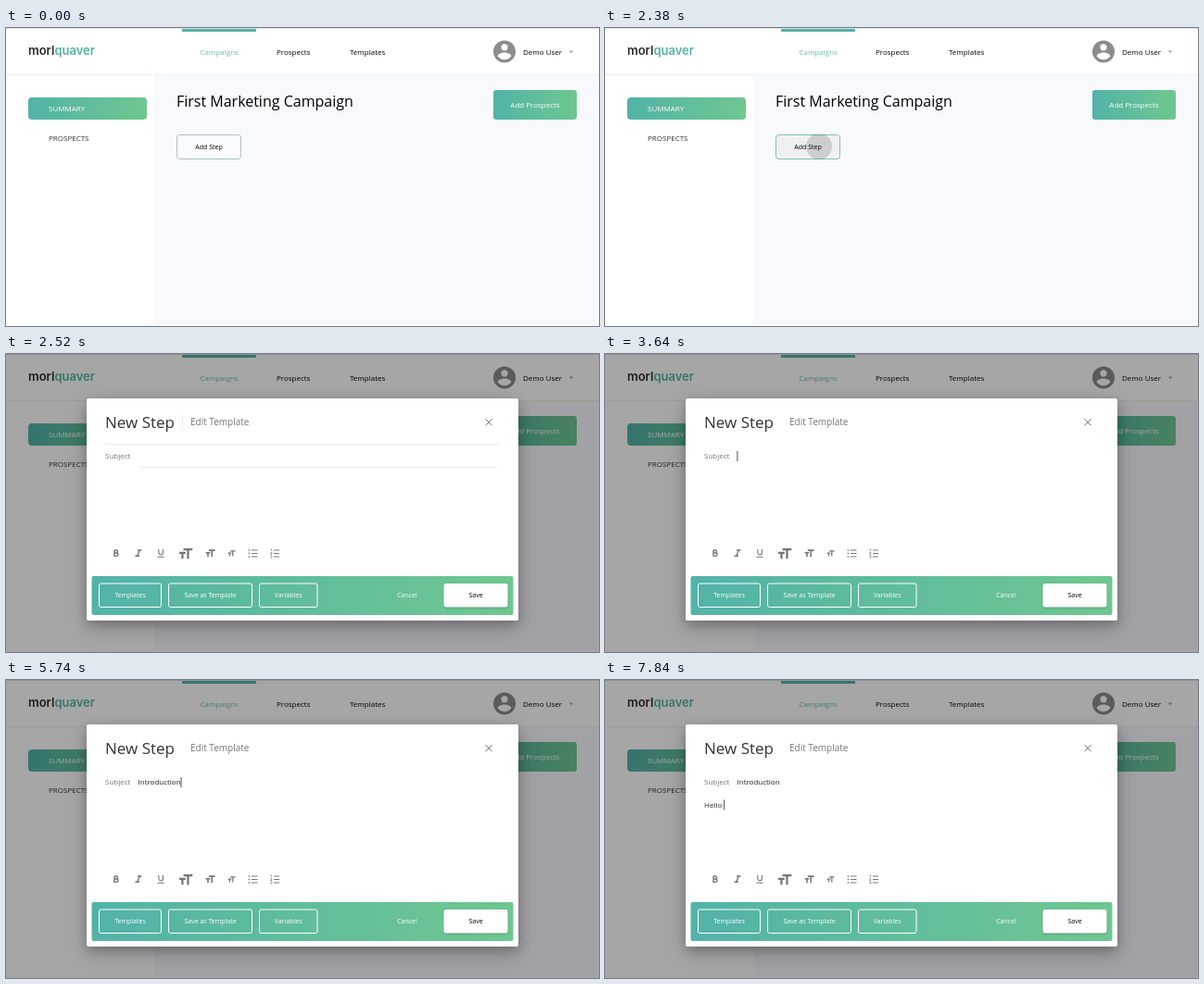
Write an HTML page that moves like this. It is 640 px wide and 322 px high and loops after 8 s.

```html
<!DOCTYPE html>
<html lang="en">
<head>
<meta charset="utf-8">
<style>
  html, body { margin: 0; width: 100%; height: 100%; overflow: hidden; background: #fff; }
  svg { display: block; width: 640px; height: 322px; }
  text { font: 8px "Open Sans", sans-serif; white-space: pre; }
  .small { font-size: 7px; }
  .mid { text-anchor: middle; }
  .logo { font: 600 13px Inter, sans-serif; }
  .light { fill: #fff; }
  .grey { fill: #777; }
  .rule { stroke: #ececec; }
  #panel { filter: drop-shadow(0 4px 6px rgba(0, 0, 0, .2)) drop-shadow(0 7px 11px rgba(0, 0, 0, .2)); }
</style>
</head>
<body>
<svg viewBox="0 0 640 322">
  <defs>
    <linearGradient id="green"><stop stop-color="#52b3a8"/><stop offset="1" stop-color="#6fc78f"/></linearGradient>
    <clipPath id="stepClip"><rect x="184" y="115" width="70" height="27" rx="3"/></clipPath>
    <path id="sizeIcon" d="M9 4v3h5v12h3V7h5V4zM3 12h3v7h3v-7h3V9H3z" fill="#757575"/>
  </defs>

  <rect width="640" height="322" fill="#fff"/>
  <rect x="160" y="51" width="479" height="269" fill="#f8f9fe"/>
  <path d="M0 .5H640" stroke="#e2e2e2"/>
  <path d="M0 50.5H640" stroke="#eee"/>
  <rect x="190" y="1" width="80" height="3" fill="#55b3a5"/>
  <text class="logo" x="24" y="29" fill="#2b2b2b">morl<tspan fill="#55b3a5">quaver</tspan></text>
  <text x="209.5" y="28.5" fill="#6dbaa8">Campaigns</text>
  <text x="292" y="28.5">Prospects</text>
  <text x="371" y="28.5">Templates</text>

  <circle cx="538" cy="25.5" r="12" fill="#8c8c8c"/>
  <circle cx="538" cy="20.8" r="3.6" fill="#fff"/>
  <path d="M530.8 30.3c0-2.4 4.8-3.7 7.2-3.7s7.2 1.3 7.2 3.7a8.6 8.6 0 0 1-14.4 0z" fill="#fff"/>
  <text x="558" y="28.5">Demo User</text>
  <path d="M607.5 24.5h5l-2.5 2.7z" fill="#aaa"/>

  <rect x="24" y="75" width="128" height="24" rx="4" fill="url(#green)"/>
  <text class="light" x="46" y="90">SUMMARY</text>
  <text x="46" y="122" fill="#333">PROSPECTS</text>

  <text x="184" y="85" style="font-size:16px">First Marketing Campaign</text>
  <rect x="526" y="67" width="90" height="32" rx="3" fill="url(#green)"/>
  <text class="light mid" x="571" y="86">Add Prospects</text>
  <rect id="step" x="184.5" y="115.5" width="69" height="26" rx="3"/>
  <circle id="ripple" cx="231" cy="128" fill="#000" fill-opacity=".14" clip-path="url(#stepClip)"/>
  <text class="small mid" x="219" y="131">Add Step</text>

  <rect id="shade" width="640" height="322"/>

  <g id="modal">
    <rect id="panel" x="87" y="48" width="466" height="240" rx="2" fill="#fff"/>
    <text x="107" y="80" fill="#333" style="font-size:17px">New Step</text>
    <text class="grey" x="199" y="77" style="font-size:10px">Edit Template</text>
    <path d="M517.5 70.2l7 7m0-7l-7 7" stroke="#666"/>
    <path id="rules" class="rule" d="M190.5 65v17M107 97.5H533M144 122.5H530"/>
    <text class="grey" x="107" y="113">Subject</text>
    <text id="subject" x="142.5" y="113" fill="#222"></text>
    <text id="body" x="107" y="138" fill="#222"></text>
    <rect id="caret" width=".8" height="11" fill="#222"/>

    <g fill="none" stroke="#757575" stroke-width="1.4">
      <path d="M117 212v6.4h2.4a1.7 1.7 0 0 0 0-3.4H117m0-3h2a1.5 1.5 0 0 1 0 3"/>
      <path d="M142 212h4.5M139.5 218.3h4.5M144.3 212l-2.6 6.3"/>
      <path d="M164.8 211v3.5a2.3 2.3 0 0 0 4.6 0V211M163.5 219.3h7" stroke-width="1.1"/>
      <path d="M265 212h6.5m-6.5 3.5h6.5m-6.5 3.5h6.5M289 212h6m-6 3.5h6m-6 3.5h6" stroke-width="1"/>
      <path d="M261.7 212h1.4m-1.4 3.5h1.4m-1.4 3.5h1.4"/>
      <path d="M285.5 211h1.2v2m-1.2 1.5h1.5l-1.5 2h1.5m-1.5 1.5h1.5v2h-1.5" stroke-width=".7"/>
    </g>
    <use href="#sizeIcon" transform="translate(184.8 207) scale(.75)"/>
    <use href="#sizeIcon" transform="translate(214 209.2) scale(.53)"/>
    <use href="#sizeIcon" transform="translate(238.3 210.6) scale(.42)"/>

    <rect x="92.5" y="240" width="455" height="42" rx="2" fill="url(#green)"/>
    <g fill="none" stroke="#fff">
      <rect x="100.5" y="248" width="67" height="25.5" rx="2"/>
      <rect x="175.5" y="248" width="90" height="25.5" rx="2"/>
      <rect x="273.5" y="248" width="62.5" height="25.5" rx="2"/>
    </g>
    <g class="mid light">
      <text class="small" x="134" y="263.3">Templates</text>
      <text class="small" x="220.5" y="263.3">Save as Template</text>
      <text class="small" x="304.7" y="263.3">Variables</text>
      <text class="small" x="433" y="263.3">Cancel</text>
    </g>
    <rect x="472.5" y="248" width="69" height="25.5" rx="2.5" fill="#fff" style="filter:drop-shadow(0 1px 1px rgba(0,0,0,.2))"/>
    <text class="small mid" x="507" y="263.3">Save</text>
  </g>
</svg>
<script>
const LOOP = 8000, STEP = 70;
const $ = id => document.getElementById(id);
const set = (id, attrs) => {
  for (const key in attrs) $(id).setAttribute(key, attrs[key]);
};
const within = (t, from, to) => t >= from && t < to;

const subject = {
  id: "subject", x: 142.5, y: 105, text: "Introduction",
  keys: [4130, 4410, 4480, 4620, 4690, 4830, 5040, 5250, 5390, 5460, 5600, 5740]
};
const body = {
  id: "body", x: 107, y: 129.5, text: "Hello ",
  keys: [6790, 7140, 7280, 7420, 7560, 7700]
};

function type(field, t) {
  $(field.id).textContent = field.text.slice(0, field.keys.filter(k => k <= t).length);
}

function draw(now) {
  const t = Math.floor(now % LOOP / STEP) * STEP;

  const hover = t >= 2240;
  set("step", { fill: hover ? "#f0f0f3" : "#fbfcff", stroke: hover ? "#7fbfb5" : "#a9c2c6" });
  set("ripple", { r: hover ? Math.min(60, Math.max(0, (t - 2298) * .171)) : 0 });

  const shown = t < 2450 ? 0 : t < 2520 ? .17 : 1;
  set("shade", { opacity: shown * .35 });
  set("modal", { opacity: shown });
  set("rules", { opacity: Math.max(0, Math.min(1, (3010 - t) / 490)) });

  type(subject, t);
  type(body, t);
  const field = t < 6300 ? subject : body;
  const caretOn = within(t, 3360, 3850) || within(t, 4130, 6300) || t >= 6580;
  set("caret", {
    x: field.x + $(field.id).getComputedTextLength(),
    y: field.y,
    opacity: caretOn ? 1 : 0
  });
}

const start = performance.now();
function tick() {
  draw(performance.now() - start);
  requestAnimationFrame(tick);
}
tick();
</script>
</body>
</html>
```
